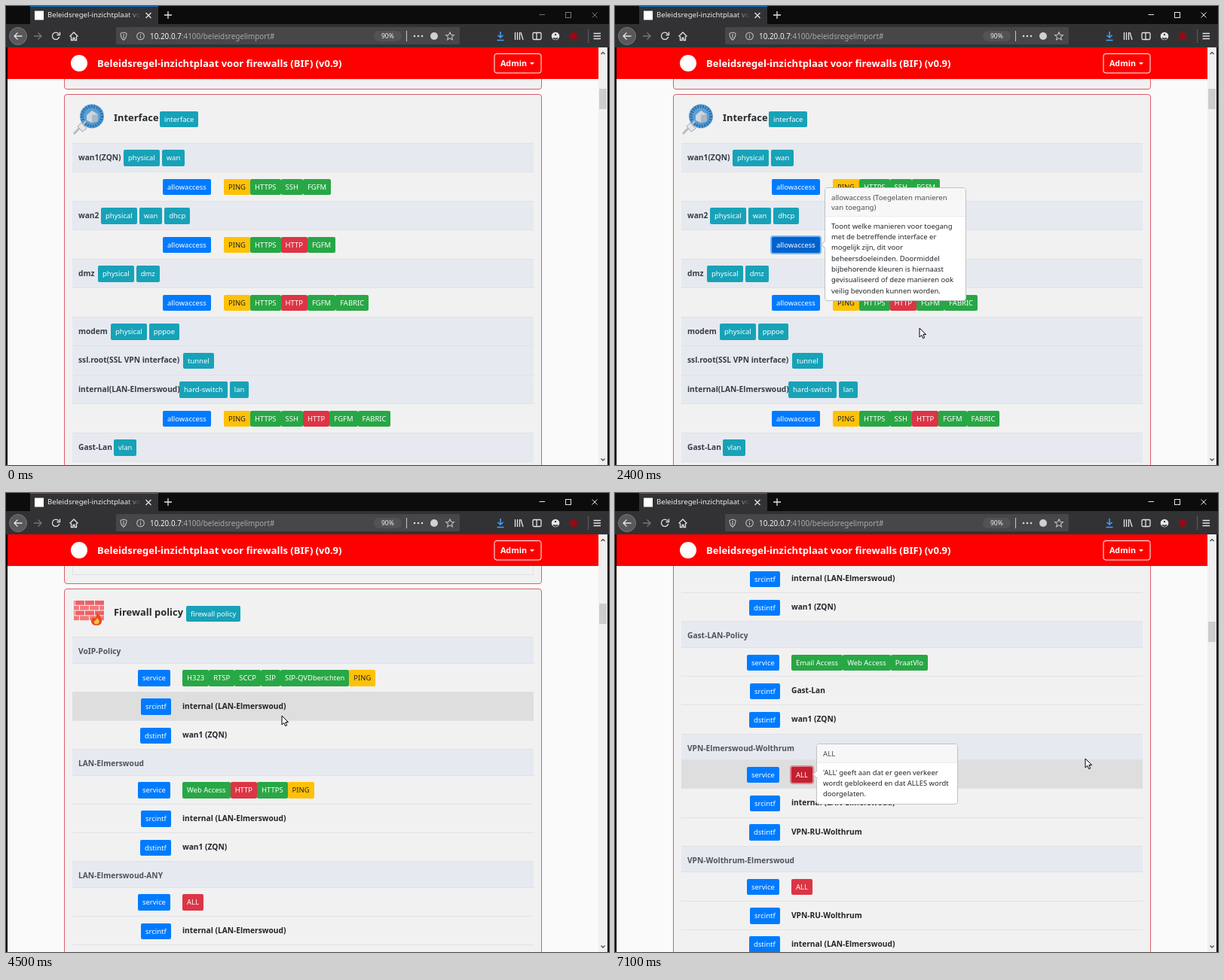
Write an HTML page that moves like this. It is 800 px wide and 610 px high and loops after 7.2 s.

```html
<!DOCTYPE html>
<html lang="nl">
<head>
<meta charset="utf-8">
<style>
html, body { margin: 0; width: 100%; height: 100%; overflow: hidden; background: #000; }
* { box-sizing: border-box; }
body { font: 9.45px/14.35px "Noto Sans", "Open Sans", sans-serif; color: #212529; cursor: default; }
#stage { position: absolute; left: 0; top: 0; width: 800px; height: 610px; overflow: hidden; background: #0c0c0d; white-space: nowrap; }
#stage div, #stage svg, #stage span { position: absolute; }
#view { left: 2px; top: 55px; width: 784px; height: 555px; overflow: hidden; background: #fafafa; }
.layer { left: -2px; top: -55px; width: 800px; height: 0; }
.card { left: 77px; width: 634px; border: 1px solid #da5f6e; border-radius: 4px; background: #f1f1f1; }
.inner { left: 88px; width: 612px; border: 1px solid #dfe1e4; border-top: 0; }
.r { left: 88px; width: 612px; border-top: 1px solid #e0e2e6; background: #f1f1f1; }
.r.head { background: #e6e9ef; }
.r.hover { background: #dedede; }
.r b, h2 { position: absolute; left: 8px; top: 0; font-size: 10.2px; line-height: 36px; color: #383d43; }
h2 { margin: 0; font-size: 12.9px; line-height: 20px; color: #25292d; }
#stage .tags { display: flex; gap: 3px; top: 8.5px; }
#stage .tags.join { gap: 0; }
#stage .b { position: relative; height: 21.5px; padding: 0 6px; border-radius: 2px; line-height: 22.5px; color: #fff; background: var(--c); }
#stage .b.on { background: var(--d); box-shadow: 0 0 0 2px var(--g); z-index: 1; }
.info { --c: #17a2b8; --d: #138496; --g: #17a2b800; }
.blue { --c: #007bff; --d: #0062cc; --g: #007bff80; }
.good { --c: #28a745; }
.bad { --c: #dc3545; --d: #c4202f; --g: #dc354580; }
#stage .warn { --c: #ffc107; color: #212529; }
#nav { left: 2px; top: 55px; width: 784px; height: 42px; background: #f00; color: #fff; font-weight: 700; }
#nav span { line-height: 20px; }
.pop { width: 188px; border: 1px solid #bfc1c4; border-radius: 4px; background: #fff; }
.pop h3 { margin: 0; padding: 5.5px 8px; font: 400 9.6px/13px "Noto Sans", "Open Sans", sans-serif; color: #4b4f54; background: #f7f7f7; border-bottom: 1px solid #ebebeb; border-radius: 3px 3px 0 0; }
.pop p { margin: 0; padding: 5.5px 8px; }
.pop::before { content: ""; position: absolute; left: -4.5px; top: 50%; width: 7px; height: 7px; margin-top: -3.5px; background: #fff; border: solid #bfc1c4; border-width: 0 0 1px 1px; transform: rotate(45deg); }
#bar { left: 786px; top: 55px; width: 12px; height: 555px; background: #f0f0f0; }
#thumb { left: 1px; width: 10px; height: 27px; background: #cdcdcd; }
#chrome { left: 0; top: 0; color: #f0f0f2; }
#cursor { left: 0; top: 0; overflow: visible; pointer-events: none; }
.edge { top: 55px; width: 2px; height: 555px; background: #000; }
</style>
</head>
<body>
<div id="stage">
  <div id="view">
    <div class="layer" id="page"></div>
    <div class="layer">
      <div id="nav">
        <svg width="784" height="42">
          <circle cx="95" cy="21" r="11" fill="#fff"/>
          <rect x="646" y="8.5" width="62" height="25.5" rx="3" fill="none" stroke="#fff"/>
          <path d="M693 20h6l-3 3z" fill="#fff"/>
        </svg>
        <span style="left:119px;top:11px;font-size:13px">Beleidsregel-inzichtplaat voor firewalls (BIF) (v0.9)</span>
        <span style="left:654px;top:11px;font-size:10.7px">Admin</span>
      </div>
    </div>
    <div class="layer" id="pops"></div>
  </div>
  <div id="bar">
    <div id="thumb"></div>
    <svg width="12" height="555" fill="none" stroke="#505050" stroke-width="1.4"><path d="M3.5 9l2.5-2.5L8.500 9M3.500 546.500l2.500 2.500l2.500-2.500"/></svg>
  </div>
  <div class="edge" style="left:0"></div><div class="edge" style="left:798px"></div>
  <div id="chrome">
    <svg width="800" height="55" fill="none" stroke="#e4e4e6" stroke-width="1.3">
      <g stroke="none">
        <path d="M0 24h800v31H0z" fill="#323234"/>
        <path d="M32 0h170v24H32z" fill="#323234"/>
        <path d="M32 0h170v1H32z" fill="#0a6fd0"/>
        <rect x="146" y="28" width="456" height="23" rx="2" fill="#474749"/>
        <rect x="488" y="33" width="37" height="14" rx="7" fill="#535356"/>
        <rect x="38" y="6.500" width="12" height="12" fill="#fff"/>
        <circle cx="568" cy="40" r="5" fill="#d0d0d3"/>
        <circle cx="753" cy="40" r="5" fill="#9c0714"/>
        <g fill="#d8d8da"><circle cx="542" cy="40" r="1.300"/><circle cx="547" cy="40" r="1.300"/><circle cx="552" cy="40" r="1.300"/></g>
      </g>
      <circle cx="16" cy="40" r="11.500" fill="#59595c" stroke="#77777a" stroke-width="1"/>
      <path d="M21.500 40H11m4.500-4.500L11 40l4.500 4.500M185.500 9l7 7m0-7l-7 7M210 12h10m-5-5v10"/>
      <path d="M37 40h10m-4.500-4.500L47 40l-4.500 4.500" stroke="#77777a"/>
      <path d="M70 37a4.700 4.700 0 1 0 .7 4M71.500 34.500V38.500H67.500"/>
      <path d="M84.500 40.500L90 35l5.500 5.500M86.500 40v5.500h2.500v-3h2v3h2.500V40"/>
      <g stroke="#c0c0c4" stroke-width="1.100">
        <path d="M156 35l4 1.300c0 4-1 7-4 9c-3-2-4-5-4-9zM156 37v6"/>
        <circle cx="178.500" cy="40" r="4.800"/><path d="M178.500 39.300v3.500M178.500 37v1.200M531.500 33v14" />
        <path d="M589 34.700l1.600 3.500 3.800.4-2.900 2.500.9 3.800-3.400-2-3.400 2 .9-3.800-2.900-2.500 3.800-.4z"/>
      </g>
      <path d="M656 34v8m-3.500-3.300L656 42l3.500-3.300M651.500 45.500h9" stroke="#45a1ff" stroke-width="1.500"/>
      <path d="M675.500 35v10M678.500 35v10M681.500 35v10M683 35l3 10"/>
      <rect x="699" y="35.500" width="11" height="9" rx="1.500"/><path d="M704 35.500v9"/>
      <circle cx="729" cy="40" r="5.300" fill="#e4e4e6" stroke="none"/><path d="M726 42.500q3 2.500 6 0M728 38h2" stroke="#323234" stroke-width="1.800"/>
      <path d="M772.500 31v18" stroke="#59595c"/>
      <path d="M779.500 36.500h9.500M779.500 40h9.500M779.500 43.500h9.500"/>
      <g id="controls" stroke-width="1"><path d="M707.500 11.500h7.500M777.500 8.500l7 7m0-7l-7 7"/><rect x="742.500" y="8.500" width="7" height="7"/></g>
    </svg>
    <div style="left:55px;top:5px;width:124px;overflow:hidden;height:15px;font-size:9.6px;-webkit-mask:linear-gradient(90deg,#000 85%,transparent)">Beleidsregel-inzichtplaat voor firewalls</div>
    <span style="left:191px;top:33px;font-size:9.900px;color:#a9a9ad"><i style="font-style:normal;color:#f5f5f7">10.20.0.7</i>:4100/beleidsregelimport#</span>
    <span style="left:498px;top:33px;font-size:8.500px">90%</span>
  </div>
  <svg id="cursor" width="1" height="1" fill="#fff" stroke="#000" stroke-linejoin="round">
    <path id="arrow" d="M0 0v12l2.800-2.600 1.900 4.300 2-.9-1.900-4.200h3.800z"/>
    <path id="hand" d="M-1.500 1q0-1.500 1.500-1.500T1.500 1v5l4.500.8q2 .5 2 2.500v3L6.500 16h-6l-5-6.200q-.5-1.500 1-1.500l2 1.500z"/>
  </svg>
</div>
<script>
const $ = id => document.getElementById(id);
const LAN = 'LAN-Elmerswoud', SITE = 'VPN-RU-Wolthrum';
const INTERNAL = `internal (${LAN})`, WAN = 'wan1 (ZQN)';
const LOOP = 7200, STEP = 100, POLICY = 848;

// A tag written as "label@id" can receive focus.
const kinds = { PING: 'warn', HTTP: 'bad', ALL: 'bad' };
const button = (tag, kind) => {
  const [label, id] = tag.split('@');
  return `<div class="b ${kind || kinds[label] || 'good'}"${id ? ` id="${id}"` : ''}>${label}</div>`;
};
const tags = (x, list, kind, join) =>
  `<div class="tags ${join ? 'join' : ''}" style="left:${x - 88}px">${list.split(',').map(t => button(t, kind)).join('')}</div>`;
const row = (y, h, body, head) =>
  `<div class="r ${head ? 'head' : 'plain'}" style="top:${y}px;height:${h}px">${body}</div>`;
const card = (y, h) => `<div class="card" style="top:${y}px;height:${h}px"></div>`;
const title = (y, text, x, tag) =>
  `<h2 style="left:143px;top:${y + 21}px">${text}</h2><div style="left:88px;top:${y + 14}px">${tags(x, tag, 'info')}</div>`;

function interfaces() {
  const items = [
    ['wan1(ZQN)', 156, 'physical,wan', 'allowaccess', 'PING,HTTPS,SSH,FGFM'],
    ['wan2', 126, 'physical,wan,dhcp', 'allowaccess@access', 'PING,HTTPS,HTTP,FGFM'],
    ['dmz', 122, 'physical,dmz', 'allowaccess', 'PING,HTTPS,HTTP@dmzHttp,FGFM,FABRIC'],
    ['modem', 139, 'physical,pppoe'],
    ['ssl.root(SSL VPN interface)', 235, 'tunnel'],
    [`internal(${LAN})`, 230, 'hard-switch,lan', 'allowaccess', 'PING,HTTPS,SSH,HTTP,FGFM,FABRIC'],
    ['Gast-Lan', 143, 'vlan', 'allowaccess', 'PING'],
    [SITE, 186, 'tunnel', 'allowaccess', 'PING,HTTPS,SSH'],
    ['VPN-SW-Ulmbron', 175, 'tunnel', 'allowaccess', 'PING,HTTPS']
  ];
  let y = 181.5, out = '';
  const add = (body, head) => { out += row(y, 38.5, body, head); y += 38.5; };
  for (const [name, x, types, access, allowed] of items) {
    add(`<b>${name}</b>` + tags(x, types, 'info'), true);
    if (access) add(tags(208, access, 'blue') + tags(289, allowed, '', true));
  }
  return out;
}

function policies() {
  const items = [
    ['VoIP-Policy', 'H323,RTSP,SCCP,SIP,SIP-QVDberichten,PING', INTERNAL, WAN],
    [LAN, 'Web Access,HTTP@lanHttp,HTTPS,PING', INTERNAL, WAN, 'service@service'],
    [LAN + '-ANY', 'ALL', INTERNAL, WAN],
    ['Gast-LAN-Policy', 'Email Access,Web Access,PraatVlo', 'Gast-Lan', WAN],
    ['VPN-Elmerswoud-Wolthrum', 'ALL@all', INTERNAL, SITE],
    ['VPN-Wolthrum-Elmerswoud', 'ALL', SITE, INTERNAL]
  ];
  let y = POLICY + 64, out = '';
  const add = (h, body, head) => { out += row(y, h, body, head); y += h; };
  const value = text => `<b style="left:146px;color:#212529">${text}</b>`;
  for (const [name, services, from, to, key = 'service'] of items) {
    add(34.6, `<b style="color:#4d545c">${name}</b>`, true);
    add(38.2, tags(175, key, 'blue') + tags(234, services, '', true));
    add(38.2, tags(179, 'srcintf', 'blue') + value(from));
    add(38.15, tags(178, 'dstintf', 'blue') + value(to));
  }
  return out;
}

const globe = `<svg style="left:88px;top:128px" width="46" height="44">
  <circle cx="26" cy="18.500" r="16" fill="#5b9fd3"/><circle cx="26" cy="18.500" r="13" fill="none" stroke="#2c6fae" stroke-width="4" stroke-dasharray="2 1.500"/>
  <path d="M19 17l7-6 8 5v9l-8 2-7-3z" fill="#cfd6dd"/><path d="M26 17l8-1v9l-8 2z" fill="#a9b7c6"/>
  <path d="M2 42L18 25" stroke="#b9bcc0" stroke-width="3"/><path d="M7 32l6 7 6-4-7-8z" fill="#e3e5e8" stroke="#a5a8ad"/></svg>`;

function wall() {
  let out = '';
  for (let r = 0; r < 4; r++)
    for (let c = 0; c < 4; c++) {
      const x = Math.max(2, c * 13 - (r % 2 ? 3 : 9));
      const end = Math.min(42, c * 13 + (r % 2 ? 9 : 3));
      if (end > x) out += `<rect x="${x}" y="${2 + r * 6.8}" width="${end - x}" height="5.800" fill="${r % 2 ? '#f4777a' : '#ee6165'}"/>`;
    }
  return `<svg style="left:88px;top:${POLICY + 14}px" width="46" height="38">${out}
    <path d="M32 18q8 6 7 12q-1 5-7 5t-7-5q0-4 3-6l2 2q3-3 2-8z" fill="#e8491d"/><path d="M33 25q4 4 2 7q-3 3-6 0q-1-3 2-4z" fill="#ffc04a"/></svg>`;
}

$('page').innerHTML = card(-60, 171) + card(117, 725) + card(POLICY, 1100) +
  `<div class="inner" style="top:0;height:98px"></div><div class="inner" style="top:790px;height:40px"></div>` +
  globe + title(117, 'Interface', 204, 'interface@iface') + interfaces() +
  wall() + title(POLICY, 'Firewall policy', 239, 'firewall policy') + policies();

const HTTP = ['HTTP', 'Wordt gebruikt om communicatie,|doormiddel een webbrowser, tussen|een weblclient en een webserver|mogelijk te maken. Data wordt met|HTTP onversleuteld verstuurd,|waardoor zonder iets te kraken de|inhoud uit te lezen valt als het|onderschept wordt., toegewezen|poorten; 80 (TCP)'];
// key, x, y, shown at, gone at, first opacity, heading, text
const pops = [
  ['iface', 261, 60, 800, 1700, .2, 'interface', 'Een firewall interface is een fysieke of|softwarematige aansluiting om|communicatie met een of meerdere|netwerken mogelijk te maken. Een|interface aangegeven als WAN|functioneert typisch als een|verbinding naar het internet, een LAN|functioneert typisch als een|verbinding naar het eigen (lokale)|netwerk.'],
  ['access', 278, 241, 1700, 2600, .6, 'allowaccess (Toegelaten manieren|van toegang)', 'Toont welke manieren voor toegang|met de betreffende interface er|mogelijk zijn, dit voor|beheersdoeleinden. Doormiddel|bijbehorende kleuren is hiernaast|gevisualiseerd of deze manieren ook|veilig bevonden kunnen worden.'],
  ['dmzHttp', 405, 311, 2600, 4800, .6, ...HTTP],
  ['lanHttp', 341, 1031, 4800, 5500, .6, ...HTTP],
  ['service', 224, 1075, 5500, 6500, .75, 'service (Toegelaten|diensten/applicaties)', 'Toont welke diensten/applicaties|doorgelaten worden op de firewall.'],
  ['all', 267, 1522, 6500, LOOP, .6, 'ALL', "'ALL' geeft aan dat er geen verkeer|wordt geblokeerd en dat ALLES wordt|doorgelaten."]
];
const lines = s => s.replaceAll('|', '<br>');
$('pops').innerHTML = pops.map(p =>
  `<div class="pop" style="left:${p[1]}px;top:${p[2]}px"><h3>${lines(p[6])}</h3><p>${lines(p[7])}</p></div>`).join('');
const popEls = [...$('pops').children];

const scrollKeys = [[2800, 0], [3200, 122], [3400, 122], [4300, 721], [5800, 721], [6300, 1189]];
const cursorKeys = [
  [200, 470, 330], [700, 237, 152], [1300, 237, 152], [1600, 238, 312], [1900, 238, 312],
  [2400, 404, 428], [2600, 380, 391], [2700, 380, 391], [3100, 680, 393], [4000, 680, 393],
  [4500, 366, 296], [4700, 318, 391], [4800, 318, 391], [5100, 724, 330], [5400, 204, 391],
  [5600, 204, 391], [6000, 560, 400], [6400, 247, 370], [6500, 247, 370], [7000, 624, 353]
];
const ease = k => k * k * (3 - 2 * k);
function at(keys, t, i = 1) {
  const n = keys.findIndex(k => k[0] > t);
  if (n < 0) return keys.at(-1)[i];
  if (!n) return keys[0][i];
  const a = keys[n - 1], b = keys[n];
  return a[i] + (b[i] - a[i]) * ease((t - a[0]) / (b[0] - a[0]));
}

function draw(t) {
  const scroll = at(scrollKeys, t);
  $('page').style.transform = $('pops').style.transform = `translateY(${-scroll}px)`;
  $('thumb').style.top = 55 + scroll * .0513 + 'px';
  $('controls').style.opacity = t < 300 ? .5 : 1;
  pops.forEach(([key, , , from, to, first], i) => {
    const open = t >= from && t < to;
    const alpha = open ? (t === from ? first : 1) : t === to ? .15 : 0;
    popEls[i].style.opacity = alpha;
    popEls[i].style.visibility = alpha ? 'visible' : 'hidden';
    $(key).classList.toggle('on', open);
  });
  const x = at(cursorKeys, t, 1), y = at(cursorKeys, t, 2), shown = t >= 200;
  const under = shown ? document.elementFromPoint(x, y + 1) : null;
  const hit = under?.closest('.r.plain'), over = under?.closest('.b');
  document.querySelectorAll('.r.hover').forEach(r => r !== hit && r.classList.remove('hover'));
  hit?.classList.add('hover');
  $('cursor').style.display = shown ? '' : 'none';
  $('cursor').style.transform = `translate(${x}px,${y}px)`;
  $('hand').style.display = over ? '' : 'none';
  $('arrow').style.display = over ? 'none' : '';
}

const start = performance.now();
let last = -1;
function tick() {
  const t = Math.floor((performance.now() - start) % LOOP / STEP) * STEP;
  if (t !== last) draw(last = t);
  requestAnimationFrame(tick);
}
tick();
</script>
</body>
</html>
```
